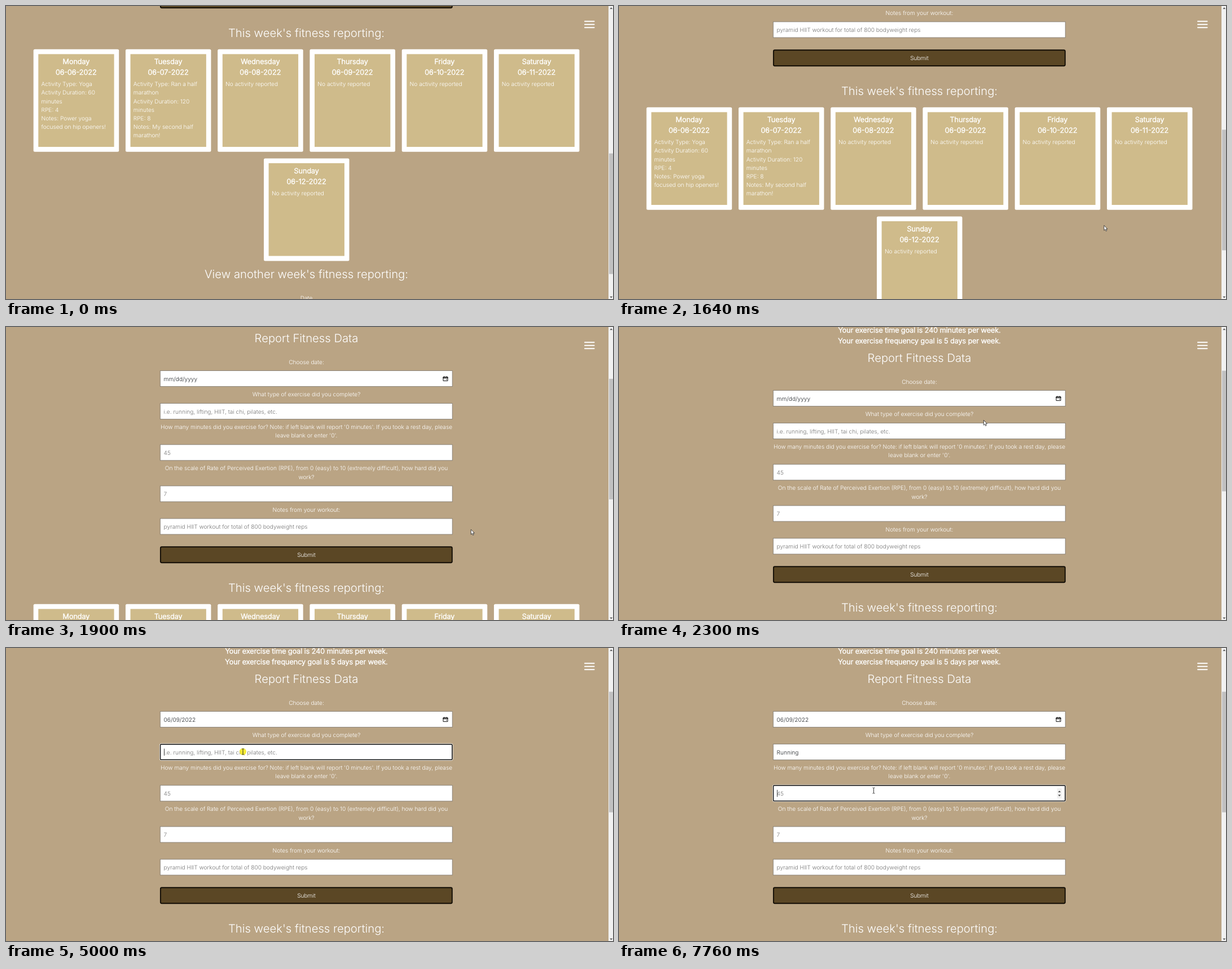
Recreate the animation shown at these times as an HTML page. Size 1076 px wide and 520 px high, loop 8000 ms.

```html
<!DOCTYPE html>
<html lang="en">
<head>
<meta charset="utf-8">
<title>Fitness report</title>
<style>
  html, body { margin: 0; width: 100%; height: 100%; overflow: hidden; background: #baa484; }
  svg { display: block; width: 1076px; height: 520px; }
  text { font: 300 10.13px Inter, sans-serif; font-optical-sizing: none; fill: #fff;
         text-rendering: geometricPrecision; white-space: pre; }
  .mid { text-anchor: middle; }
  .head { font-size: 20.25px; }
  .bold { font-size: 12.65px; stroke: #fff; stroke-width: .55px; }
  .value { fill: #212529; }
  .hint { fill: #757575; }
  .cal { font: 400 6.8px "Liberation Sans", Arial, sans-serif; fill: #111; }
  .strong { font-weight: 700; }
  .dim { fill: #75756c; }
  .link { fill: #0078d7; }
  .today { fill: #fff; font-weight: 700; }
  #popup > .panel { filter: drop-shadow(0 8px 9px rgba(0, 0, 0, .3)); }
</style>
</head>
<body>
<svg id="stage" viewBox="0 0 1076 520"></svg>
<script>
const LOOP = 8000, CENTER = 532.5, FIELD_X = 273, FIELD_W = 518.5, FIELD_H = 28.6, TEXT_X = 279.6;
const BLUE = '#0078d7';
const SIZES = { head: 20.25, bold: 12.65, cal: 6.8 };

// y is the middle of the capital letters
function text(x, y, content, cls = '', id = '') {
  const size = SIZES[cls.split(' ').find(name => SIZES[name])] || 10.13;
  return `<text x="${x}" y="${y + size * .364}" class="${cls}" id="${id}">${content}</text>`;
}
const centered = (y, content, cls = '') => text(CENTER, y, content, 'mid ' + cls);
const rect = (x, y, w, h, fill, extra = '') =>
  `<rect x="${x}" y="${y}" width="${w}" height="${h}" fill="${fill}" ${extra}/>`;
const path = (d, fill = 'none', extra = '') => `<path d="${d}" fill="${fill}" ${extra}/>`;
const group = (id, content) => `<g id="${id}">${content}</g>`;

const fieldTops = [112.6, 170.6, 243.8, 317, 375];
const fields = fieldTops.map(y =>
  rect(FIELD_X + .3, y, FIELD_W - .6, FIELD_H - .6, '#fff', 'stroke="#7a746b" stroke-width=".8"')).join('');

const focusRing = (id, y) => group(id,
  rect(FIELD_X - .4, y - .7, FIELD_W + .8, FIELD_H + .8, 'none', 'stroke="#fff" rx="2"') +
  rect(FIELD_X + .6, y + .3, FIELD_W - 1.2, FIELD_H - 1.2, 'none', 'stroke="#101010" stroke-width="1.5" rx="1.5"'));

function card(x, y, day, date, lines = ['No activity reported']) {
  const mid = x + 75.7;
  return rect(x, y, 151.5, 182, '#fff', 'rx="2.5"') +
    rect(x + 8.6, y + 8.6, 134.3, 164.6, '#cfbb8b') +
    text(mid, y + 21.5, day, 'mid bold') +
    text(mid, y + 41, `06-${date}-2022`, 'mid bold') +
    lines.map((line, i) => text(x + 13.9, y + 61.8 + i * 15.18, line)).join('');
}

function cards() {
  const days = ['Monday', 'Tuesday', 'Wednesday', 'Thursday', 'Friday', 'Saturday'];
  const dates = ['06', '07', '08', '09', '10', '11'];
  const notes = [
    ['Activity Type: Yoga', 'Activity Duration: 60', 'minutes', 'RPE: 4', 'Notes: Power yoga', 'focused on hip openers!'],
    ['Activity Type: Ran a half', 'marathon', 'Activity Duration: 120', 'minutes', 'RPE: 8',
     'Notes: My second half', 'marathon!']
  ];
  return days.map((day, i) => card(48.7 + i * 163.25, 526.8, day, dates[i], notes[i])).join('') +
    card(457, 720.4, 'Sunday', '12');
}

function calendar() {
  const column = i => 287.2 + i * 15.77;
  let out = rect(274, 142, 121, 156.7, '#fff', 'class="panel" rx="3" stroke="#b5a78f" stroke-width=".5"') +
    text(279, 154, 'June 2022', 'cal strong') +
    path('M313.6 153h4.6l-2.3 2.6z', '#111') +
    path('M363.8 159.5v-9m-4 4l4-4l4 4M381.7 150.5v9m-4-4l4 4l4-4', 'none', 'stroke="#333" stroke-width=".9"');
  ['Su', 'Mo', 'Tu', 'We', 'Th', 'Fr', 'Sa'].forEach((name, i) => out += text(column(i), 175, name, 'cal mid'));
  out += rect(358.7, 199.5, 14.6, 14.6, BLUE, 'stroke="#101010" stroke-width="1.3" rx="1"');
  for (let i = 0; i < 42; i++) {
    const date = new Date(2022, 4, 29 + i), june = date.getMonth() === 5;
    const cls = !june ? 'dim' : date.getDate() === 10 ? 'today' : '';
    out += text(column(i % 7), 191.2 + Math.floor(i / 7) * 15.77, date.getDate(), 'cal mid ' + cls);
  }
  return out + text(285.7, 287.5, 'Clear', 'cal link') + text(365, 287.5, 'Today', 'cal link');
}

const page =
  centered(5, 'Your exercise time goal is 240 minutes per week.', 'bold') +
  centered(24.5, 'Your exercise frequency goal is 5 days per week.', 'bold') +
  centered(54.8, 'Report Fitness Data', 'head') +
  fields +
  centered(97, 'Choose date:') +
  centered(154.7, 'What type of exercise did you complete?') +
  centered(212.6, "How many minutes did you exercise for? Note: if left blank will report '0 minutes'. If you took a rest day, please") +
  centered(227.8, "leave blank or enter '0'.") +
  centered(285.8, 'On the scale of Rate of Perceived Exertion (RPE), from 0 (easy) to 10 (extremely difficult), how hard did you') +
  centered(301, 'work?') +
  centered(359, 'Notes from your workout:') +
  rect(279.3, 121, 10, 12, BLUE, 'id="monthMark"') +
  text(TEXT_X, 127, '<tspan id="month"></tspan><tspan id="dayYear"></tspan>', 'value') +
  path('M775 124h8v6.6h-8zM775 124h8v1.8h-8zM776.6 122.3v1.5M781.4 122.3v1.5M780 128.2h1.6', 'none', 'stroke="#111"') +
  text(TEXT_X, 185, '', '', 'exercise') +
  text(TEXT_X, 258, '45', 'hint') +
  text(TEXT_X, 331, '7', 'hint') +
  text(TEXT_X, 389, 'pyramid HIIT workout for total of 800 bodyweight reps', 'hint') +
  focusRing('typeRing', fieldTops[1]) +
  group('minutesRing', focusRing('', fieldTops[2]) + rect(776.5, 249, 8.5, 18, '#f0f0f0') +
    path('M778.3 256h4.8l-2.4-2.8zM778.3 260.4h4.8l-2.4 2.8z', '#444')) +
  rect(280, 0, .8, 12.4, '#111', 'id="caret"') +
  rect(273.9, 425.2, 516.9, 28, '#5b4725', 'stroke="#120d05" stroke-width="1.9" rx="2.2"') +
  centered(439.2, 'Submit') +
  centered(498, "This week's fitness reporting:", 'head') +
  cards() +
  centered(926, "View another week's fitness reporting:", 'head') +
  centered(968, 'Date');

const $ = id => document.getElementById(id);
$('stage').innerHTML =
  rect(0, 0, 1076, 520, '#baa484') +
  group('page', page) +
  group('popup', calendar()) +
  path('M1026 27.2h16.6M1026 32.7h16.6M1026 38.2h16.6', 'none', 'stroke="#fff" stroke-width="2" stroke-linecap="round"') +
  rect(1068, 0, 8, 520, '#f1f1f1') +
  rect(1069, 0, 7, 214, '#c1c1c1', 'id="thumb"') +
  path('M1070.3 5.3h5l-2.5-2.8zM1070.3 515.5h5l-2.5 2.8z', '#505050') +
  group('pointer',
    '<circle id="clickSpot" r="6" fill="#f6ea1c" fill-opacity=".88"/>' +
    path('M.4 .4v8.8l2-1.8l1.4 3.1l1.5-.7l-1.4-3h2.7z', '#fff', 'id="arrow" stroke="#222" stroke-width=".8"') +
    path('M-2 -5h1.4l.6 .5l.6-.5h1.4M0-4.5v9M-2 5h1.4l.6-.5l.6 .5h1.4', 'none', 'id="beam" stroke="#222" stroke-width=".9"'));

// time, x, y of the pointer
const pointerPath = [
  [300, 932, 455], [640, 860, 389], [820, 860, 389], [840, 859.4, 389], [1640, 859.4, 389], [1770, 856, 394],
  [2300, 646, 165], [2680, 778, 127], [3180, 778, 127], [3580, 367.6, 211], [3920, 350, 208],
  [4330, 350, 208], [4860, 420, 184], [7340, 420, 184], [7530, 451.5, 253]
];
const clicks = [2760, 4120, 4930, 7530];
const keyTimes = [6000, 6200, 6340, 6540, 6670, 6870, 6940];

const between = (t, from, to) => t >= from && t < to;
const show = (id, visible) => $(id).setAttribute('visibility', visible ? 'inherit' : 'hidden');
function ease(t, from, to) {
  const p = Math.min(1, Math.max(0, (t - from) / (to - from)));
  return p * p * (3 - 2 * p);
}

function pointerAt(t) {
  const i = pointerPath.findIndex(key => key[0] > t);
  if (i === 0) return pointerPath[0].slice(1);
  if (i < 0) return pointerPath[pointerPath.length - 1].slice(1);
  const [t0, x0, y0] = pointerPath[i - 1], [t1, x1, y1] = pointerPath[i], p = ease(t, t0, t1);
  return [x0 + (x1 - x0) * p, y0 + (y1 - y0) * p];
}

function drawPointer(t, scroll) {
  const [x, y] = pointerAt(t);
  const overField = fieldTops.slice(1).some(top => between(y + scroll, top, top + FIELD_H)) &&
    between(x, FIELD_X, FIELD_X + FIELD_W) && !between(t, 2940, 4300);
  $('pointer').setAttribute('transform', `translate(${x} ${y})`);
  show('pointer', t >= 300);
  show('arrow', !overField);
  show('beam', overField);
  show('clickSpot', clicks.some(time => between(t, time, time + 220)));
}

function drawForm(t) {
  const picked = t >= 4300, monthActive = between(t, 2800, 4930);
  $('month').textContent = picked ? '06' : 'mm';
  $('dayYear').textContent = picked ? '/09/2022' : '/dd/yyyy';
  $('month').style.fill = monthActive ? '#fff' : '';
  $('monthMark').setAttribute('width', $('month').getComputedTextLength() + .6);
  show('monthMark', monthActive);
  show('popup', between(t, 2940, 4300));

  const typed = 'Running'.slice(0, keyTimes.filter(time => t >= time).length);
  const exercise = $('exercise');
  exercise.textContent = typed || 'i.e. running, lifting, HIIT, tai chi, pilates, etc.';
  exercise.setAttribute('class', typed ? 'value' : 'hint');

  const onMinutes = t >= 7530;
  show('typeRing', between(t, 4930, 7530));
  show('minutesRing', onMinutes);
  show('caret', between(t, 4930, 5500) || between(t, 6000, 7470) || onMinutes);
  $('caret').setAttribute('x', typed && !onMinutes ? TEXT_X + exercise.getComputedTextLength() : 280);
  $('caret').setAttribute('y', onMinutes ? 251.8 : 178.6);
}

function draw(now) {
  const t = now % LOOP;
  const scroll = Math.round(450 * (1 - ease(t, 1486, 1986)));
  $('page').setAttribute('transform', `translate(0 ${-scroll})`);
  $('thumb').setAttribute('y', 77.6 + scroll * .409);
  drawForm(t);
  drawPointer(t, scroll);
  requestAnimationFrame(draw);
}
requestAnimationFrame(draw);
</script>
</body>
</html>
```
